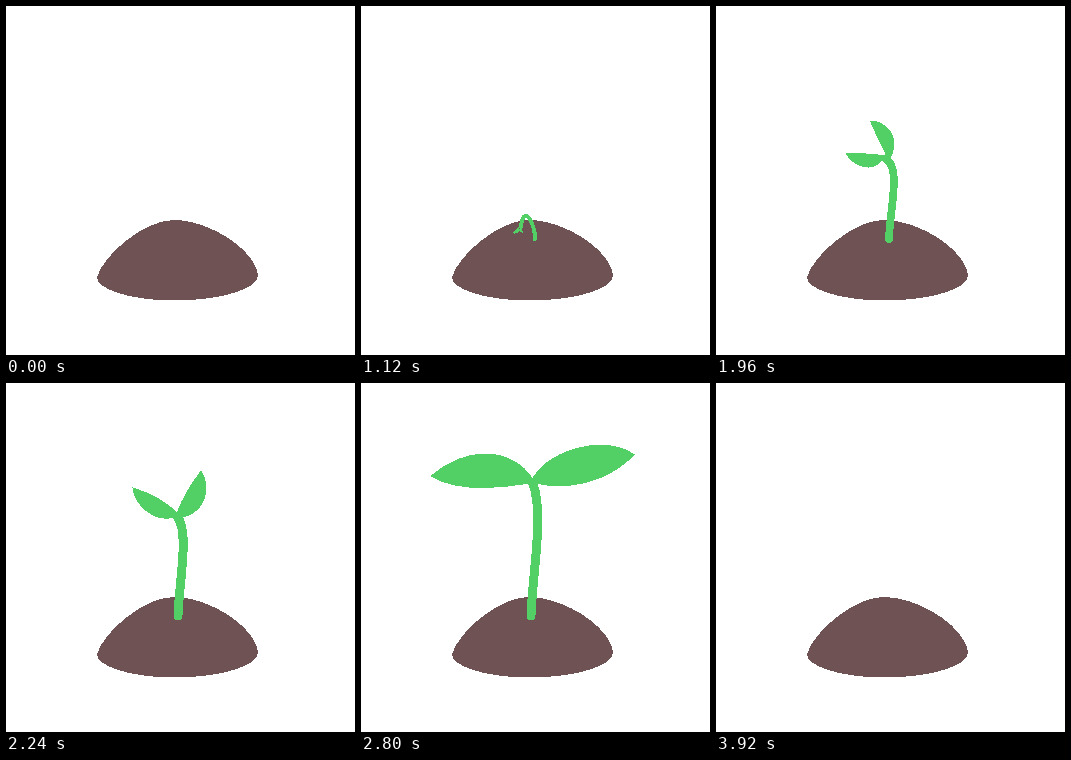
Animation of 349 by 349 pixels, one loop 4.06 s. Source, as an HTML page:

```html
<!DOCTYPE html>
<html lang="en">
<head>
<meta charset="utf-8">
<title>Sprout</title>
<style>
  html, body { margin: 0; width: 100%; height: 100%; overflow: hidden; background: #fff; }
  svg { display: block; width: 100%; height: 100%; }
</style>
</head>
<body>
<svg viewBox="0 0 349 349" shape-rendering="crispEdges">
  <path fill="#6e5254" d="M91 271C97 250 137 214 168 214C203 214 250 244 252 270C252 282 217 294.5 168 294.5C122 294.5 90 282 91 271Z"/>
  <g id="plant" fill="#52d066">
    <path id="stem" fill="none" stroke="#52d066" stroke-linecap="round"/>
    <path id="left"/>
    <path id="right"/>
  </g>
</svg>
<script>
const STEP = 140, STEPS = 29, LEAVES = 8, UNFOLD = 12, GROWN = 22, GONE = 28;

// step, stem width, node x and y, stem bend x and y, then length and angle of the left and right leaf
const poses = [
  [1, 4, 169, 231, 2, 0, 0, -42, 0, 285],
  [LEAVES, 4, 160, 219, 2, -23, 12, -42, 8, 285],
  [UNFOLD, 6.5, 169, 170, 18, 1, 30, -21, 28, 170],
  [16, 9, 171, 129, 13, 15, 51, 29, 48, 60],
  [20, 9, 171.5, 95, 12, 30, 102.5, 1, 105, 13],
  [GROWN, 12.5, 171, 69, 10, 35, 117, -18, 127, -17]
];

const leftLeaf = { side: -1, curl: 0.48, thickness: 0.4, pace: 2, peak: -0.04, fold: 0.17 };
const rightLeaf = { side: 1, curl: 0.41, thickness: 0.5, pace: 2.3, peak: 0.18, fold: 0.06 };

const $ = id => document.getElementById(id);

function poseAt(step) {
  const next = Math.max(1, poses.findIndex(pose => pose[0] >= step));
  const a = poses[next - 1], b = poses[next];
  const t = (step - a[0]) / (b[0] - a[0]);
  return a.map((v, i) => v + (b[i] - v) * t);
}

// The outer edge flattens while the inner edge curls into a dome.
function leafPath(leaf, unfolded, x, y, width, length, degrees) {
  const angle = degrees * Math.PI / 180, cos = Math.cos(angle), sin = Math.sin(angle);
  const at = (along, across) => [
    x + leaf.side * length * (along * cos - across * sin),
    y - length * (along * sin + across * cos)
  ];
  const open = unfolded ** leaf.pace, closed = 1 - open;
  const inner = leaf.curl * open, innerSkew = 0.25 * open ** 2;
  const outer = leaf.thickness * closed, outerSkew = 0.4 * closed;
  const fold = leaf.fold * open ** 3;
  return `M${x} ${y}C` + [
    at(0.3 - 0.18 * open, inner * (1 - innerSkew)),
    at(0.65 + leaf.peak * open, inner * (1 + innerSkew)),
    at(1, 0),
    at(0.63 + 0.3 * closed, -outer * (1 - outerSkew) - fold / 2),
    at(0.34 + 1.2 * fold, -outer * (1 + outerSkew) + fold),
    [x + leaf.side * width / 2, y + width * 0.65]
  ].join(" ") + "Z";
}

function draw(time) {
  const frame = Math.floor(time / STEP) % STEPS;
  const visible = frame > 0 && frame < GONE;
  $("plant").style.display = visible ? "" : "none";
  if (!visible) return;

  const step = Math.min(frame, GROWN);
  const unfolded = Math.max(0, (step - UNFOLD) / (GROWN - UNFOLD));
  const [, width, x, y, bendX, bendY, leftLength, leftAngle, rightLength, rightAngle] = poseAt(step);

  const baseX = 174 - 5 * unfolded, baseY = 233, top = y + width / 2;
  const lift = (baseY - top) / 3 - 0.6 * Math.min(0, bendY);
  $("stem").setAttribute("stroke-width", width);
  $("stem").setAttribute("d",
    `M${baseX} ${baseY}C${baseX + 2 * unfolded} ${baseY - lift} ${x + bendX} ${top + bendY} ${x} ${top}`);

  const leafy = step >= LEAVES;
  $("left").setAttribute("d", leafy ? leafPath(leftLeaf, unfolded, x, y, width, leftLength, leftAngle) : "");
  $("right").setAttribute("d", leafy ? leafPath(rightLeaf, unfolded, x, y, width, rightLength, rightAngle) : "");
}

const start = performance.now();
function tick() {
  draw(performance.now() - start);
  requestAnimationFrame(tick);
}
tick();
</script>
</body>
</html>
```
